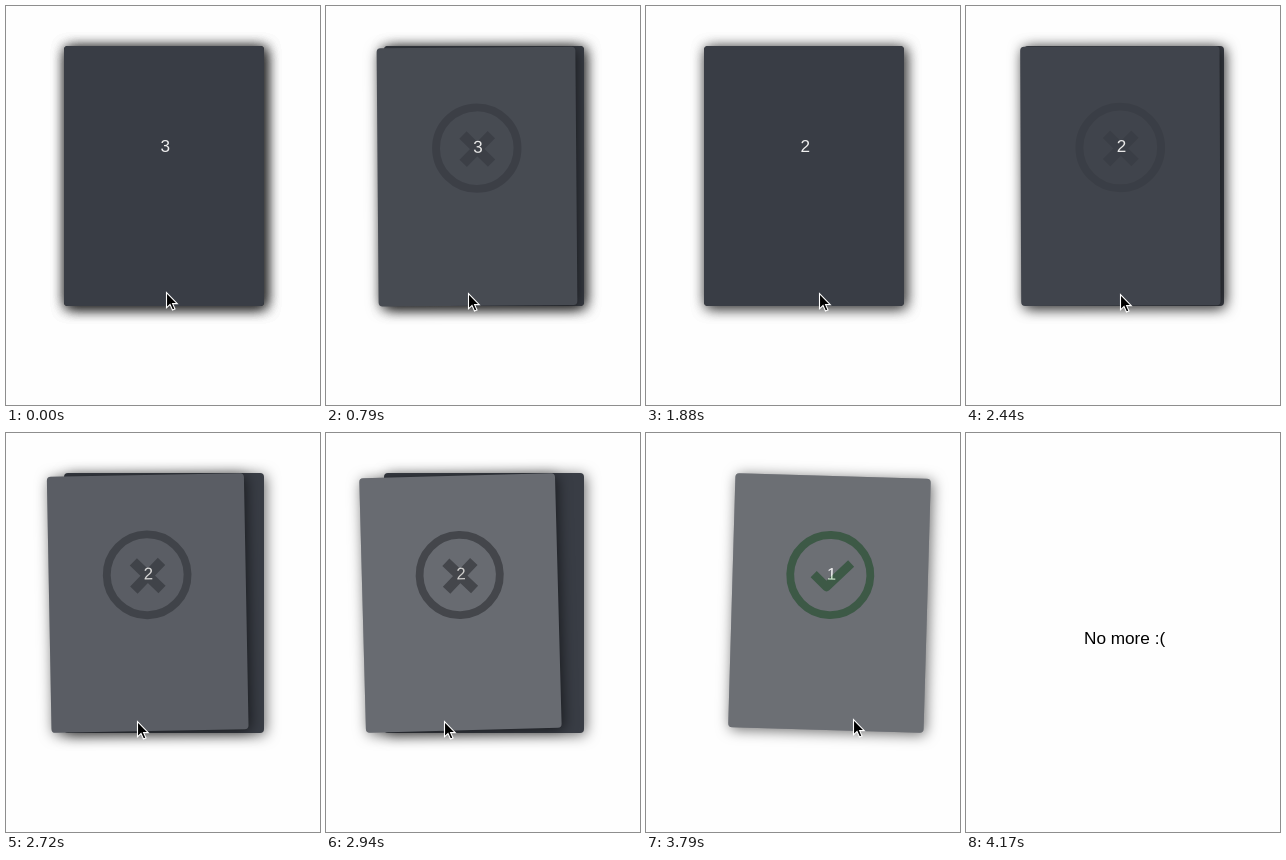
These frames come from a looping animation (314 px wide and 399 px high, 4.88 s). An HTML page:

```html
<!DOCTYPE html>
<html lang="en">
<head>
<meta charset="utf-8">
<title>Swipe cards</title>
<style>
  html, body { margin: 0; width: 100%; height: 100%; overflow: hidden; background: #fefefe; }
  #stage { position: relative; width: 314px; height: 399px; overflow: hidden; }
  svg { position: absolute; left: 0; top: 0; overflow: visible; }
  text { font: 17.2px "Liberation Sans", Arial, sans-serif; text-anchor: middle; }
  .card {
    position: absolute; left: 58px; top: 40px; width: 200px; height: 260px;
    border-radius: 4px; background: #393d45;
    box-shadow: 2px 2px 14px rgba(0, 0, 0, .58);
  }
  .card text { fill: #f0f0f0; }
  .tint circle, .tint path { fill: none; }
</style>
</head>
<body>
<div id="stage">
  <svg width="314" height="399"><text x="158.6" y="211">No more :(</text></svg>
  <svg id="cursor" width="14" height="20">
    <path d="M.5 .5V15.8L4 12.5L6.5 18L9 17L6.6 11.6H11.3Z" fill="#000" stroke="#fff" stroke-width="1.1"/>
  </svg>
</div>
<script>
const LOOP = 4880;
const STEP = 45;      // pace of the pointer, ms
const FOLLOW = .56;   // share of the pointer's travel a card makes
const stage = document.getElementById('stage');
const cursor = document.getElementById('cursor');

// Pointer strokes: it rests at the last point in between.
const strokes = [
  { from: 530, to: 790, x: 142, y: 287 },
  { from: 1000, to: 1200, x: 161, y: 287 },
  { from: 1440, to: 1770, x: 193, y: 287 },
  { from: 1820, to: 1880, x: 173, y: 287 },
  { from: 1940, to: 1970, x: 160, y: 288 },
  { from: 2350, to: 3080, x: 105, y: 288 },
  { from: 3120, to: 3380, x: 160, y: 286 },
  { from: 3440, to: 3440, x: 173, y: 286 },
  { from: 3490, to: 3640, x: 192, y: 286 },
  { from: 3790, to: 3850, x: 221, y: 286 },
  { from: 3910, to: 3910, x: 176, y: 287 },
  { from: 4080, to: 4125, x: 273, y: 372 },
  { from: 4170, to: 4170, x: 400, y: 500 }
];

const drags = [
  { down: 530, up: 1200, x: 154.5, y: 286 },
  { down: 1440, up: 1820, x: 161, y: 287, swiped: true },
  { down: 2350, up: 3120, x: 160, y: 288, swiped: true },
  { down: 3440, up: 3910, x: 161, y: 286, swiped: true }
];

const icon = (color, path, width) => `
  <g class="tint" stroke="${color}">
    <rect width="200" height="260" rx="4" fill="#fff" stroke="none"/>
    <circle cx="100" cy="101.4" r="41" stroke-width="8"/>
    <path d="${path}" stroke-width="${width}" stroke-linejoin="round"/>
  </g>`;

const cards = [1, 2, 3].map(n => {
  const el = document.createElement('div');
  el.className = 'card';
  el.innerHTML = `<svg width="200" height="260">
    <text x="101.3" y="106">${n}</text>
    ${icon('#68645f', 'M86.2 88L114.8 116.6M114.8 88L86.2 116.6', 10.5)}
    ${icon('#4baa4b', 'M83 101L96.5 113.5L121 89', 9)}</svg>`;
  stage.insertBefore(el, cursor);
  const [no, yes] = el.querySelectorAll('.tint');
  return { el, no, yes };
});

function pointerAt(t) {
  let x = 160, y = 286;
  for (const s of strokes) {
    if (t < s.from) break;
    const n = Math.round((s.to - s.from) / STEP);
    const u = t < s.to ? (t - s.from) / (s.to - s.from) : 1;
    const p = (Math.floor(u * n) + 1) / (n + 1);
    x += (s.x - x) * p;
    y += (s.y - y) * p;
  }
  return { x, y };
}

function draw(t) {
  const { x, y } = pointerAt(t);
  const drag = drags.find(d => t >= d.down && t < d.up);
  const left = cards.length - drags.filter(d => d.swiped && t >= d.up).length;

  cards.forEach((card, i) => {
    const held = drag && i === left - 1;
    const dx = held ? (x - drag.x) * FOLLOW : 0;
    const dy = held ? (y - drag.y) * FOLLOW : 0;
    card.el.style.visibility = i < left ? 'visible' : 'hidden';
    card.el.style.transform = held
      ? `translate(${dx}px, ${dy}px) rotate(${dx * .065}deg) scale(${1 - Math.abs(dx) * .0009})`
      : 'none';
    card.no.style.opacity = Math.max(0, -dx / 100);
    card.yes.style.opacity = Math.max(0, dx / 100);
  });
  cursor.style.transform = `translate(${Math.round(x)}px, ${Math.round(y)}px)`;
}

const began = performance.now();
function tick() {
  draw((performance.now() - began) % LOOP);
  requestAnimationFrame(tick);
}
tick();
</script>
</body>
</html>
```
